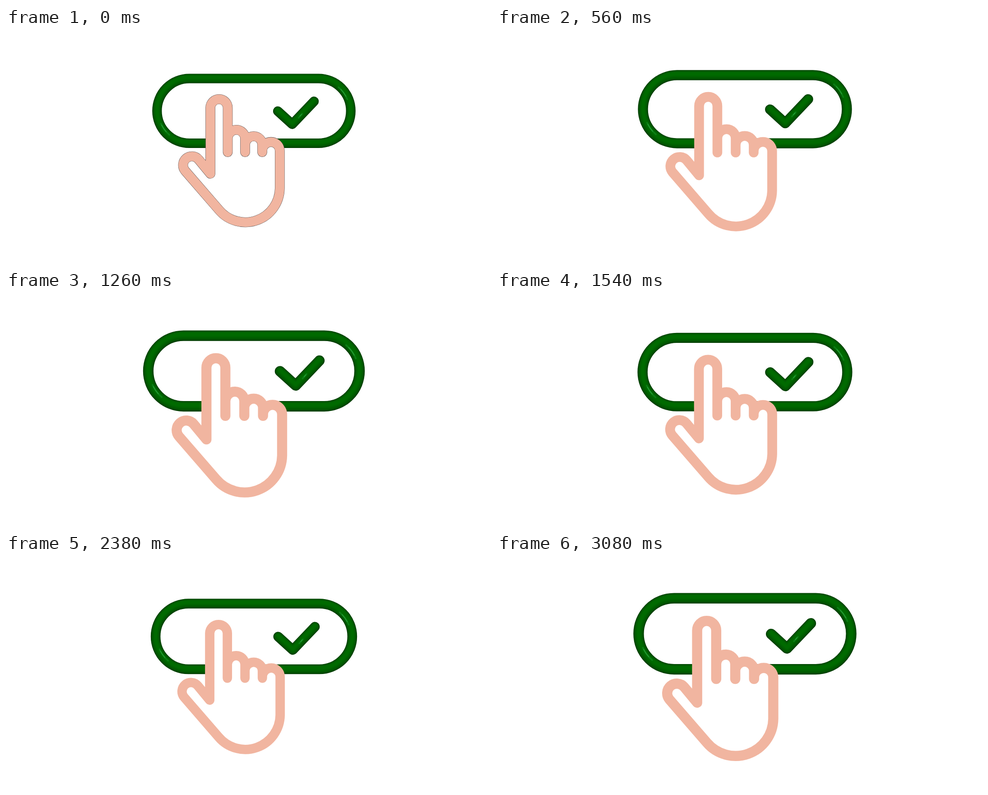
An HTML page for the animation above (3150 ms loop, 1075 by 521 pixels).

```html
<!DOCTYPE html>
<html lang="en">
<head>
<meta charset="utf-8">
<title>Tap to confirm</title>
<style>
  html, body { margin: 0; width: 100%; height: 100%; overflow: hidden; background: #fff; }
  svg { display: block; width: 100%; height: 100%; }
  path { fill: none; stroke-linecap: round; stroke-linejoin: round; }
</style>
</head>
<body>
<svg viewBox="0 0 1075 521">
  <g id="scene">
    <g id="button"></g>
    <g id="hand"></g>
  </g>
</svg>
<script>
const STEP = 70, LOOP = 3150, PERIOD = 30;
const GROWTH = 0.0988, LAG = 0.2;
const PIVOT = { x: 549.5, y: 254.7 };

const PILL = 'M406.5 112H692.5A71.75 71.75 0 0 1 692.5 255.5H406.5A71.75 71.75 0 0 1 406.5 112Z';
const CHECK = 'M602.5 184.3L634.5 213.3L682.6 162.7';
const PALM = 'M453 323V177A19.25 19.25 0 0 1 491.5 177V245A19.25 19.25 0 0 1 530 245' +
  'V259A19 19 0 0 1 568 259V272A19.4 19.4 0 0 1 606.8 272V355.5' +
  'A76.2 76.2 0 0 1 472.4 403.6L397.1 316.6A19.5 19.5 0 0 1 426.9 291.4Z';
const FINGERS = 'M491.5 177V275M530 245V275M568 259V275';

const scene = document.getElementById('scene');
const button = document.getElementById('button');
const hand = document.getElementById('hand');

function addPath(parent, d, stroke, width, extra = {}) {
  const path = document.createElementNS('http://www.w3.org/2000/svg', 'path');
  const attrs = { d, stroke, 'stroke-width': width, ...extra };
  for (const key in attrs) path.setAttribute(key, attrs[key]);
  parent.append(path);
  return path;
}

// Stacked strokes, lighter and narrower toward the top, read as a round tube.
function addTube(d) {
  const layers = 8;
  for (let i = 0; i < layers; i++) {
    const k = i / (layers - 1);
    const green = Math.round(58 + 48 * Math.sqrt(k));
    addPath(button, d, `rgb(0,${green},0)`, 21.2 - 15 * k, { transform: `translate(0 ${-2.6 * k})` });
  }
}

function addGlint(wide, narrow) {
  addPath(button, wide, '#0b7c14', 3.5);
  addPath(button, narrow, '#2aa23a', 1.4);
}

function arc(cx, cy, r, from, to) {
  const at = deg => {
    const a = deg * Math.PI / 180;
    return `${cx + r * Math.cos(a)} ${cy + r * Math.sin(a)}`;
  };
  return `M${at(from)}A${r} ${r} 0 0 1 ${at(to)}`;
}

addTube(PILL);
addTube(CHECK);
addGlint(arc(406.5, 184, 69, 130, 156), arc(406.5, 184, 69, 138, 153));
addGlint(arc(692.5, 184, 69, -50, -22), arc(692.5, 184, 69, -44, -28));
addGlint('M648.5 199L656.5 190', 'M651.5 195.5L655 191.5');

addPath(hand, PALM, 'none', 0, { style: 'fill:#fff' });
const outline = addPath(hand, PALM + FINGERS, '#4a4444', 21.6);
addPath(hand, PALM + FINGERS, '#f1b5a0', 20.5);

function draw(ms) {
  const tick = Math.floor((ms % LOOP) / STEP);
  const wave = (1 - Math.cos((tick - LAG) / PERIOD * 2 * Math.PI)) / 2;
  const { x, y } = PIVOT;
  scene.setAttribute('transform',
    `translate(${x} ${y}) scale(${1 + GROWTH * wave}) translate(${-x} ${-y})`);
  // The dark rim shows only on the first beat of the loop.
  outline.style.display = tick === 0 ? '' : 'none';
}

const start = performance.now();
function loop() {
  draw(performance.now() - start);
  requestAnimationFrame(loop);
}
draw(0);
requestAnimationFrame(loop);
</script>
</body>
</html>
```
